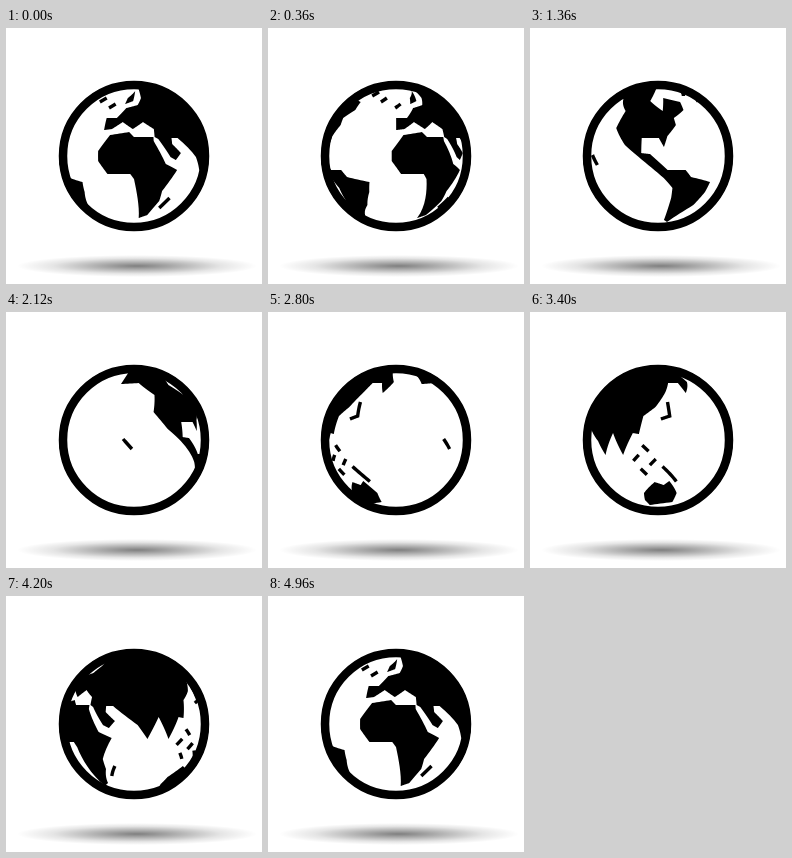
An HTML page with a canvas for the animation above (5000 ms loop, 256 by 256 pixels).

```html
<!DOCTYPE html>
<html lang="en">
<head>
<meta charset="utf-8">
<title>Spinning globe</title>
<style>
  html, body { margin: 0; height: 100%; overflow: hidden; background: #fff; }
  canvas { display: block; width: 100vmin; height: 100vmin; }
</style>
</head>
<body>
<canvas width="256" height="256"></canvas>
<script>
const ctx = document.querySelector('canvas').getContext('2d');
const LOOP = 5000, STEP = 40, TURN_STEPS = 124;
const CENTER = 128, RADIUS = 73;

// A row of equal peninsulas and bays.
const zigzag = (lon, step, count, even, odd) =>
  Array.from({ length: count }, (_, i) => [lon + i * step, i % 2 ? odd : even]).flat();

// A short straight island.
const dash = (lon, y, width, height) =>
  [lon - width / 2, y - height / 2, lon + width / 2, y + height / 2];

// Corners are pairs of longitude (degrees) and height (pixels below the equator).
const africa = [-20,-21, -4,-24, 0,-19, 16,-19, 16,-15, 26,8, 37,14, 26,35, 26,45, 18,59, 7,62,
  0,23, -3,18, -22,18, -29.5,5, -29.5,-5];
const mediterranean = zigzag(-19, 9, 5, -27, -34);
const arabia = [17,-19, 20,-17, 30,1, 35,4, 40,-3, 32,-12, 32,-18, 38,-18, 58,1];
const southAsia = zigzag(66, 9, 4, 15, -7);
const eastAsia = [98,-6, 101,-24, 111,-33, 121,-48, 126,-57, 139,-57, 143,-47, 154,-58, 150,-68];
const northEurope = [9,-68, 9,-58, 4,-51, -8,-48, -16,-38, -26,-38, -26,-26];
const scandinavia = [-10,-52, -8,-58, 2,-65, -1,-55];
const australia = [95,60, 97,53, 110,42, 119,45, 124,41, 135,53, 135,62, 99,65];
const northAmerica = [-170,-56, -165,-68, -102,-68, -108,-55, -94,-45, -92,-58, -72,-54, -72,-46,
  -84,-38, -83,-31, -91,-20, -94,-9, -98,-18, -112,-18, -112,-3, -105,-2];
const southAmerica = [-91,14, -76,14, -70.5,21, -49,26, -51,36, -58,49, -82,66, -89,64, -86,42,
  -86,32, -94,22];
const pacificCoast = [-114,1, -126,-11, -137,-28, -133,-45, -148,-57];

const land = [
  africa,
  [...mediterranean, ...arabia, ...southAsia, ...eastAsia, ...northEurope],
  scandinavia,
  australia,
  [...northAmerica, ...southAmerica, ...pacificCoast]
];

const islands = [
  [122,-38, 123,-24, 115.6,-21],
  dash(124, 34, 14, 15),
  dash(-159, 4, 7, 10),
  dash(33, 47, 7, -10)
];
for (let i = 0; i < 3; i++) islands.push(dash(-58 + 17 * i, -62 + 6 * i, 6, -4));
for (let i = 0; i < 4; i++) {
  const angle = (i * 90 - 80) * Math.PI / 180;
  islands.push(dash(102 + 7 * Math.cos(angle), 20 + 12 * Math.sin(angle), 5, i % 2 ? -6 : 6));
}

function lineTo(lon, y) {
  const angle = Math.max(-90, Math.min(90, lon)) * Math.PI / 180;
  const rowRadius = Math.sqrt(RADIUS * RADIUS - y * y);
  ctx.lineTo(CENTER + rowRadius * Math.sin(angle), CENTER + y);
}

// Splits each edge so that it bends with the sphere.
function trace(points, turn, closed) {
  const n = points.length, parts = 8;
  ctx.beginPath();
  for (let i = 0; i < (closed ? n : n - 2); i += 2) {
    const [lon, y, nextLon, nextY] = [0, 1, 2, 3].map(k => points[(i + k) % n]);
    for (let j = 0; j <= parts; j++) {
      const f = j / parts;
      lineTo(lon + (nextLon - lon) * f + turn, y + (nextY - y) * f);
    }
  }
}

function drawGlobe(turn) {
  ctx.fillStyle = ctx.strokeStyle = '#000';
  for (const shift of [turn, turn - 360]) {
    for (const shape of land) {
      trace(shape, shift, true);
      ctx.fill();
    }
    ctx.lineWidth = 3.4;
    for (const island of islands) {
      trace(island, shift, false);
      ctx.stroke();
    }
  }
  ctx.lineWidth = 8.5;
  ctx.beginPath();
  ctx.arc(CENTER, CENTER, 71, 0, 2 * Math.PI);
  ctx.stroke();
}

function drawShadow() {
  const shade = ctx.createRadialGradient(0, 0, 0, 0, 0, 120);
  shade.addColorStop(0, 'rgba(0,0,0,.5)');
  shade.addColorStop(.35, 'rgba(0,0,0,.3)');
  shade.addColorStop(.7, 'rgba(0,0,0,.1)');
  shade.addColorStop(1, 'rgba(0,0,0,0)');
  ctx.save();
  ctx.translate(131, 238);
  ctx.scale(1, 11 / 120);
  ctx.fillStyle = shade;
  ctx.fillRect(-120, -120, 240, 240);
  ctx.restore();
}

function draw() {
  const step = Math.floor(performance.now() % LOOP / STEP);
  ctx.fillStyle = '#fff';
  ctx.fillRect(0, 0, 256, 256);
  drawShadow();
  drawGlobe(step / TURN_STEPS * 360);
  requestAnimationFrame(draw);
}
draw();
</script>
</body>
</html>
```
